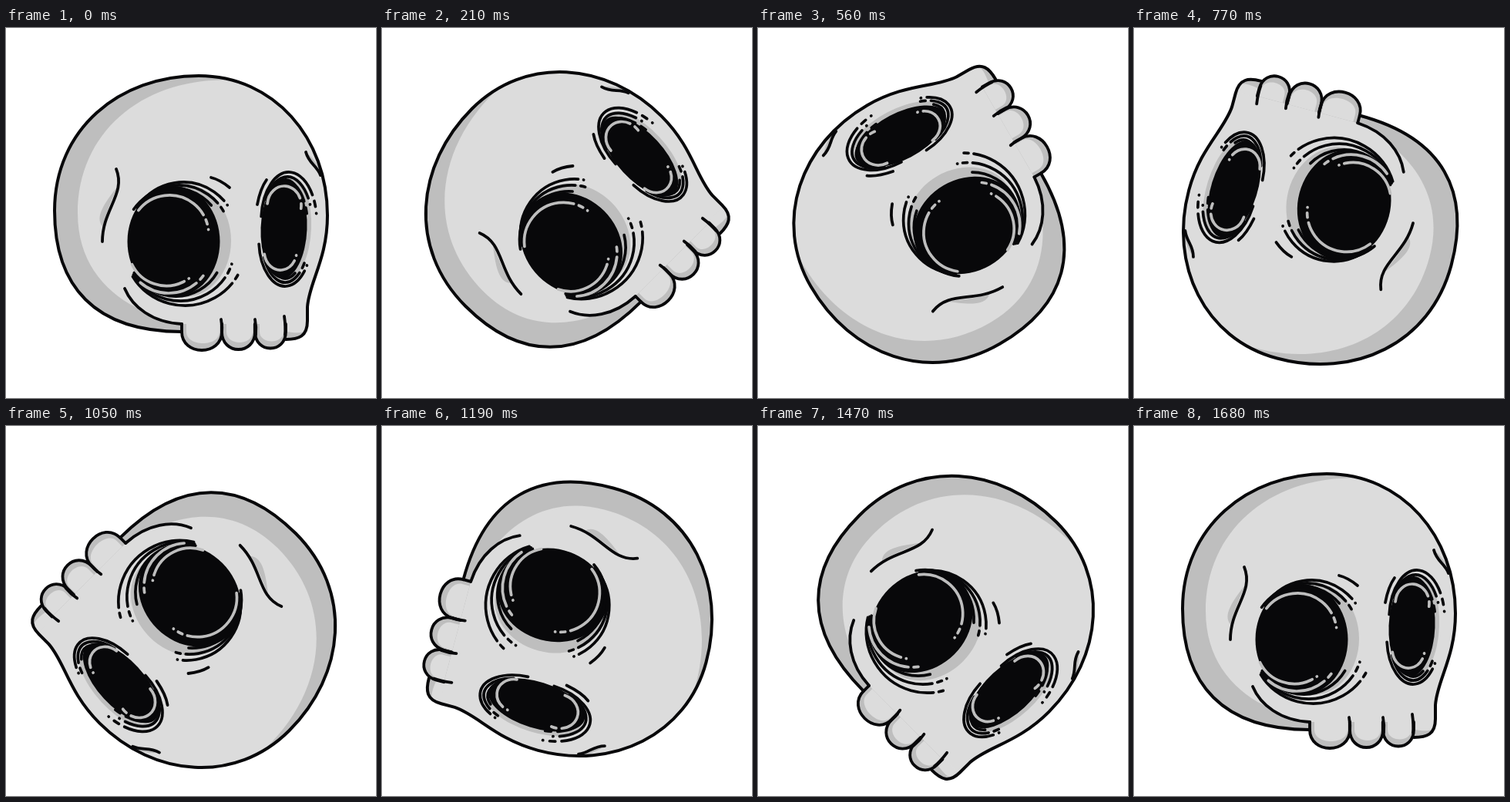
An HTML page with a canvas for the animation above (1750 ms loop, 480 by 480 pixels).

```html
<!DOCTYPE html>
<html>
<head>
<meta charset="utf-8">
<style>
html, body { margin: 0; width: 100%; height: 100%; overflow: hidden; background: #fff; }
canvas { display: block; }
</style>
</head>
<body>
<canvas id="stage" width="480" height="480"></canvas>
<script>
const ctx = document.getElementById('stage').getContext('2d');
const LIGHT = '#dcdcdc', SHADE = '#bebebe', INK = '#08080a';
const STEP_MS = 70, STEPS = 25, POSES = 6;
const CENTER_X = 242, CENTER_Y = 250;

const CRANIUM = new Path2D(`M228 394C115 394 63 335 63 237C63 131 147 62 250 62
  C348 62 417 143 417 243C417 300 393 330 391 362V380C391 400 380 404 363 404`);
const LIT = new Path2D(`M300 68C185 60 93 130 93 240C93 300 125 340 168 362
  Q194 380 228 384H450V40H300`);

function fill(path, color) {
  ctx.fillStyle = color;
  ctx.fill(path);
}

function stroke(path, color = INK, width = 4) {
  ctx.strokeStyle = color;
  ctx.lineWidth = width;
  ctx.stroke(path);
}

const fillShape = (d, color) => fill(new Path2D(d), color);
const line = d => stroke(new Path2D(d), INK, 3.8);

function oval(cx, cy, rx, ry, color, tilt = 0) {
  const path = new Path2D();
  path.ellipse(cx, cy, rx, ry, tilt, 0, 2 * Math.PI);
  fill(path, color);
}

// Elliptic arc in degrees that breaks up into the dashes and dots of its tail.
function ring(cx, cy, rx, ry, from, to, tail = '', color = INK) {
  const path = new Path2D(), dir = Math.sign(to - from);
  const perPixel = dir * 360 / (Math.PI * (rx + ry));
  const arc = (a, b) => {
    const [start, end] = [a, b].map(v => v * Math.PI / 180);
    path.moveTo(cx + rx * Math.cos(start), cy + ry * Math.sin(start));
    path.ellipse(cx, cy, rx, ry, 0, start, end, dir < 0);
  };
  arc(from, to);
  for (const mark of tail) {
    from = to + 7 * perPixel;
    to = from + (mark === '-' ? 6 : 0.2) * perPixel;
    arc(from, to);
  }
  stroke(path, color, 3.7);
}

// Draws one nested ring per tail.
const rings = (tails, shape) => tails.forEach((tail, i) => ring(...shape(i), tail));
const glint = (...shape) => ring(...shape, SHADE);

function drawTooth(left, right, bottom) {
  const side = 394, dip = side + (bottom - side) / 0.75;
  const cup = (l, r, d) => `M${l} ${side - 10}V${side}C${l} ${d} ${r} ${d} ${r} ${side}V${side - 10}`;
  fillShape(cup(left, right, dip), SHADE);
  fillShape(cup(left + 6, right - 3, dip - 12), LIGHT);
  line(cup(left, right, dip));
}

function drawHead() {
  fill(CRANIUM, SHADE);
  ctx.save();
  ctx.clip(CRANIUM);
  fill(LIT, LIGHT);
  fillShape('M360 382H392V388C388 397 378 396 364 394Z', LIGHT);
  fillShape('M389 161Q404 172 410 193Z', SHADE);
  ctx.restore();

  drawTooth(228, 280, 418);
  drawTooth(280, 323, 417);
  drawTooth(323, 363, 415.5);
  stroke(CRANIUM);
  for (const [x, top] of [[279, 378], [323, 378], [361, 374]]) {
    line(`M${x} ${top}Q${x + 2} 388 ${x + 1} 398`);
  }

  fillShape('M145 205C134 220 112 245 126 258Q128 243 145 205', SHADE);
  line('M143 183C156 215 125 235 125 277');
  line('M154 338C164 362 190 382 228 384');
  line('M389 161C393 176 403 178 408 191');
  line('M266 194Q278 197 290 207');
  line('M338 197Q330 208 326 229');
}

function drawLargeEye() {
  oval(232, 276, 60, 73, SHADE);
  oval(217.5, 277, 60, 72, INK);
  rings(['.', '-', ''], i => [230 - 6 * i, 270 + i, 70 - 3 * i, 70 - 3 * i, 215, 319]);
  rings(['-', '-.', ''], i => [232 - 6 * i, 285 + i, 78 - 8 * i, 75 - 7 * i, 150, 38 - 4 * i]);
  glint(212, 268, 51, 51, 218, 330, '-.');
  glint(208, 285, 49.5, 49.5, 154, 62, '.');
  glint(211, 288, 56, 56, 131, 50, '-');
}

function drawSmallEye() {
  oval(367, 259, 29, 67, SHADE, 0.04);
  oval(360.5, 260, 30, 65, INK, 0.04);
  rings(['-.', '.', '-'], i => [367 - 2 * i, 250 + 2 * i, 36 - 4 * i, 63 - 4 * i, 185 + 25 * i, 328]);
  rings(['.', '-', ''], i => [362, 275 - i, 34 - 4 * i, 60 - 4 * i, 175 - 20 * i, 42 + 9 * i]);
  glint(361, 230, 22, 25, 185, 338, '-');
  glint(356, 290, 21, 24, 172, 30, '.');
}

function draw(now) {
  const step = Math.floor(now / STEP_MS) % STEPS;
  const pose = step % POSES, quarter = Math.floor(step / POSES);
  ctx.fillStyle = '#fff';
  ctx.fillRect(0, 0, 480, 480);
  ctx.save();
  ctx.lineCap = ctx.lineJoin = 'round';
  ctx.translate(CENTER_X, CENTER_Y);
  // Six poses repeat, a quarter turn further each time, with a small lift inside the quarter.
  ctx.rotate(-quarter * Math.PI / 2);
  ctx.translate(2 * Math.sin(Math.PI * pose / 6), -7 * Math.sin(Math.PI * pose / 5));
  ctx.rotate(-pose * Math.PI / 12);
  ctx.translate(-CENTER_X, -CENTER_Y);
  drawHead();
  drawLargeEye();
  drawSmallEye();
  ctx.restore();
}

const start = performance.now();
function tick() {
  draw(performance.now() - start);
  requestAnimationFrame(tick);
}
tick();
</script>
</body>
</html>
```
